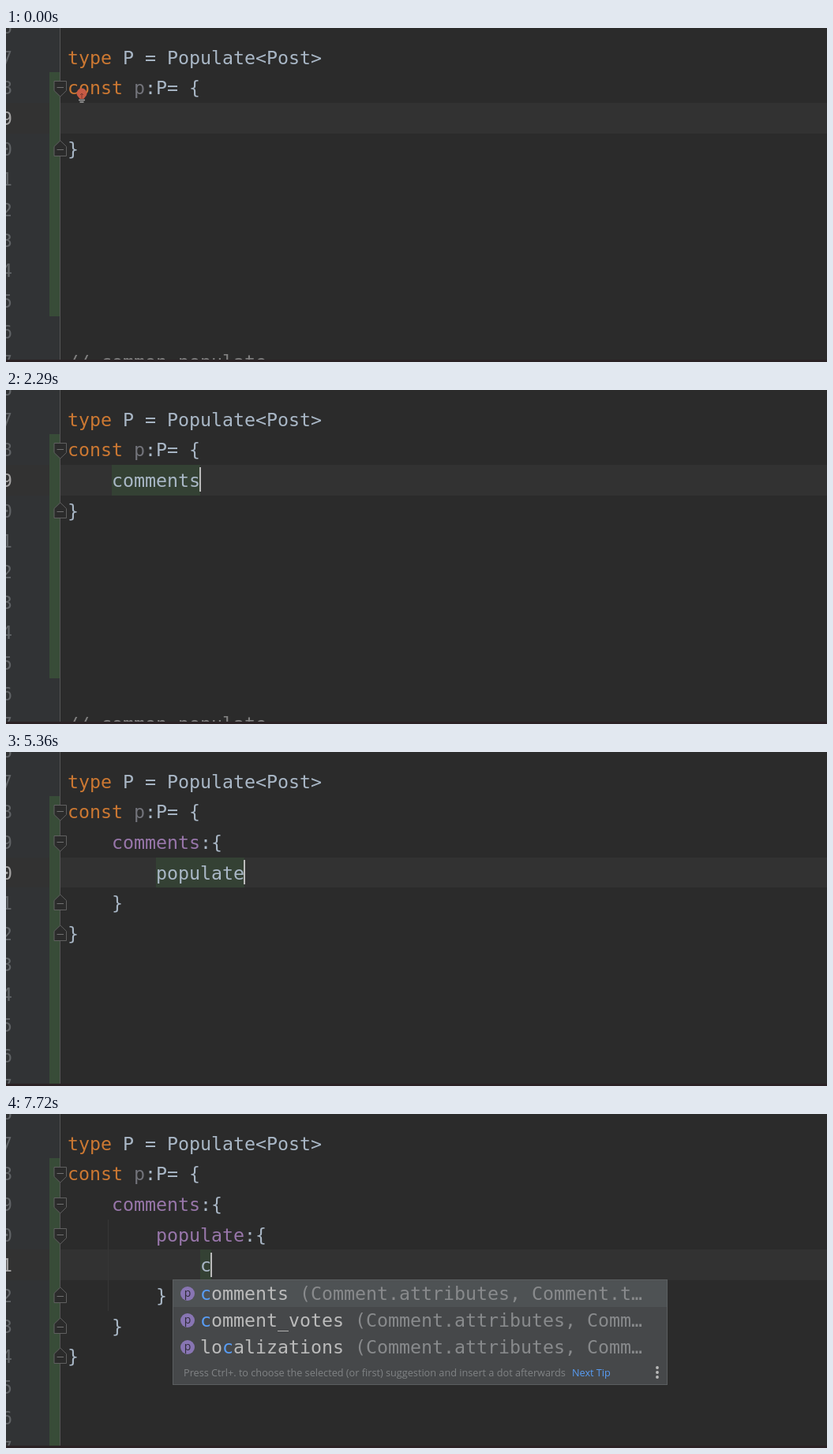
Animation of 1040x424 px, one loop 8000 ms. Source, as an HTML page:

```html
<!DOCTYPE html>
<html lang="en">
<head>
<meta charset="utf-8">
<title>Typed completion</title>
<style>
html, body { margin: 0; width: 100%; height: 100%; overflow: hidden; background: #2b2b2b; }
svg { display: block; width: 100vw; height: 100vh; }
text { white-space: pre; font: 23.25px "DejaVu Sans Mono", monospace; }
.tip { font: 12.7px "Open Sans", sans-serif; }
.icon { font: 14px "Open Sans", sans-serif; }
</style>
</head>
<body>
<svg id="stage" viewBox="0 0 1040 424"></svg>
<script>
(() => {
const stage = document.getElementById('stage');
const LOOP = 8000, CHAR = 14, LEFT = 78, ROW = 38.67, NEVER = 1e9;
const TEXT = '#a9b7c6', KEY = '#cc7832', PROP = '#9876aa', DIM = '#72737a';

// Each word is typed, completed from the popup, then opened as a nested object.
const words = [
  { word: 'comments', type: 1690, mark: 1760, popup: 1830, accept: 2290, wave: 2710,
    colon: 2910, brace: 3240, error: 3310, fixed: 3640, enter: 3640, fold: 4170,
    owner: 'Post', items: ['comments', 'localizations'] },
  { word: 'populate', type: 4830, mark: 4900, popup: 4900, accept: 5360, wave: 5760,
    colon: 5960, brace: 6310, error: 6450, fixed: 6850, enter: 7050, fold: 7380,
    owner: 'Populate', items: ['populate'] },
  { word: 'comments', type: 7510, mark: 7580, popup: 7650, accept: NEVER, wave: NEVER,
    colon: NEVER, brace: NEVER, error: NEVER, fixed: NEVER, enter: NEVER, fold: NEVER,
    owner: 'Comment', items: ['comments', 'comment_votes', 'localizations'] }
];

const rowTop = line => 17.5 + ROW * line;
const edge = line => Math.round(rowTop(line));
const baseline = line => Math.round(rowTop(line) + 28);
const colX = col => LEFT + CHAR * col;
const within = (t, a, b) => t >= a && t < b;

const rect = (x, y, w, h, fill, extra = '') =>
  `<rect x="${x}" y="${y}" width="${w}" height="${h}" fill="${fill}" ${extra}/>`;
const path = (d, stroke, fill = 'none', width = 1) =>
  `<path d="${d}" stroke="${stroke}" fill="${fill}" stroke-width="${width}"/>`;
const safe = s => s.replace(/&/g, '&amp;').replace(/</g, '&lt;');
const label = (x, y, s, fill, cls = '') =>
  `<text x="${x}" y="${y}" fill="${fill}" class="${cls}">${safe(s)}</text>`;
const code = (line, col, s, fill = TEXT) => label(colX(col), baseline(line), s, fill);
const mark = (line, col, n, fill) =>
  rect(colX(col), edge(line), n * CHAR, edge(line + 1) - edge(line), fill);

function wave(line, col, n) {
  const y = edge(line) + 30.5, end = colX(col + n) - 1;
  let d = `M${colX(col)} ${y + 3}`;
  for (let x = colX(col) + 3, up = true; x <= end; x += 3, up = !up) d += `L${x} ${y + (up ? 0 : 3)}`;
  return path(d, '#bc3f3c', 'none', 1.2);
}

function fold(line, open) {
  const y = edge(line) + (open ? 11.5 : 28.5), s = open ? 1 : -1;
  return path(`M61 ${y}H76.500V${y + 12 * s}L68.750 ${y + 19.5 * s}L61 ${y + 12 * s}Z`, '#606060', '#2b2b2b') +
    path(`M64.500 ${y + 8 * s}H73`, '#707070');
}

function gutter(current, depth) {
  let out = rect(0, 0, 68, 424, '#313335') +
    rect(0, edge(current), 1040, edge(current + 1) - edge(current), '#323232') +
    rect(55, 56, 14, edge(9 + 2 * depth) - 56, '#384c38') +
    rect(68, 0, 1, 424, '#555555');
  for (let i = -1; i <= 10; i++)
    out += label(-6, baseline(i), String((i + 7) % 10), i === current ? '#a4a3a3' : '#606366');
  return out;
}

function property(t, p, level) {
  if (t < p.type) return '';
  const line = 2 + level, col = 4 * (level + 1), end = col + p.word.length;
  const shown = t < p.accept ? p.word[0] : p.word;
  const matched = within(t, p.error, p.enter);
  let out = '';
  if (within(t, p.mark, p.colon)) out += mark(line, col, shown.length, '#344134');
  if (matched) out += mark(line, end + 1, 2, '#3b514d');
  out += code(line, col, shown, t < p.colon ? TEXT : PROP);
  if (t >= p.colon) out += code(line, end, ':');
  if (t >= p.brace) out += code(line, end + 1, t < p.enter ? '{}' : '{', matched ? '#ffef28' : TEXT);
  if (within(t, p.wave, p.brace)) out += wave(line, col, p.word.length);
  if (within(t, p.error, p.fixed)) out += wave(line, end + 3, 1) + wave(line + 1, col - 4, 1);
  return out;
}

function caret(t, depth) {
  if (t < 950 || within(t, 1490, 1690)) return '';
  const p = words[depth];
  let col = 4 * (depth + 1);
  if (t >= p.type) col += t < p.accept ? 1 : p.word.length;
  if (t >= p.colon) col++;
  if (t >= p.brace) col++;
  return rect(colX(col) - 1, Math.round(rowTop(2 + depth) + 3.5), 2, 31, '#bbbbbb');
}

function popup(p, level) {
  const x = colX(4 * (level + 1)) - 35, y = Math.floor(rowTop(3 + level));
  const n = p.items.length, h = 34 * n + 32;
  let out = rect(x + .5, y + .5, 626, h - 1, '#46484a', 'stroke="#5b5e60"') +
    rect(x + 1, y + 1, 625, 34, '#4e5254');
  p.items.forEach((name, i) => {
    const cy = y + 18 + 34 * i, base = cy + 8, hit = name.indexOf(p.word[0]);
    const full = `${name} (${p.owner}.attributes, ${p.owner}.type, ${p.owner}.key)`;
    const detail = full.slice(name.length, 39) + '…';
    const at = k => x + 35 + CHAR * k;
    out += `<circle cx="${x + 19}" cy="${cy}" r="9" fill="#8875b3"/>` +
      `<text x="${x + 19}" y="${cy + 4}" fill="#2f2b38" text-anchor="middle" class="icon">p</text>` +
      label(at(0), base, name.slice(0, hit), '#bbbbbb') +
      label(at(hit), base, name[hit], '#589df6') +
      label(at(hit + 1), base, name.slice(hit + 1), '#bbbbbb') +
      label(at(name.length), base, detail, '#888a8c');
  });
  const foot = y + h - 11;
  out += label(x + 14, foot, 'Press Ctrl+. to choose the selected (or first) suggestion and insert a dot afterwards', '#808385', 'tip') +
    label(x + 506, foot, 'Next Tip', '#589df6', 'tip');
  for (const dy of [-11, -5, 1]) out += `<circle cx="${x + 614}" cy="${foot + dy}" r="1.9" fill="#bbbbbb"/>`;
  return out;
}

function bulb() {
  return '<path d="M96 76.500a6.500 6.500 0 0 1 4 11.500l-1.500 2h-5l-1.500-2a6.500 6.500 0 0 1 4-11.500z" fill="#c75b45"/>' +
    path('M94 85l2-2 2 2M96 83v6', '#7d392f') +
    path('M92 91.500h8M93.500 94h5', '#a7a7a7', 'none', 1.5);
}

function pointer(t) {
  const step = Math.min(9, Math.floor((t - 70) / 75.5)) / 9;
  const k = 1 - (1 - step) ** 2;
  const x = 889 + (297.5 - 889) * k, y = 374 + (125 - 374) * k;
  return path(`M${x - 5} ${y - 10}h4l1 1l1-1h4M${x} ${y - 9}v18M${x - 5} ${y + 10}h4l1-1l1 1h4`, '#d0d0d0', 'none', 1.4);
}

function draw(t) {
  const depth = words.filter(p => t >= p.enter).length;
  let out = rect(0, 0, 1040, 424, '#2b2b2b') + gutter(2 + depth, depth);
  if (t >= 7380) out += rect(129, edge(3), 1, edge(6) - edge(3), '#373737');

  out += code(0, 0, 'type', KEY) + code(0, 5, 'P = Populate<Post>') +
    code(1, 0, 'const', KEY) + code(1, 6, 'p', DIM) + code(1, 7, ':P= {') +
    code(10 + 2 * depth, 0, '// common populate', '#808080');

  words.forEach((p, level) => out += property(t, p, level));
  for (let level = 0; level <= depth; level++) {
    const close = 3 + 2 * depth - level;
    out += code(close, 4 * level, '}');
    if (level === 0 || t >= words[level - 1].fold) out += fold(1 + level, true) + fold(close, false);
  }

  if (t < 1090) out += bulb();
  out += caret(t, depth);
  words.forEach((p, level) => { if (within(t, p.popup, p.accept)) out += popup(p, level); });
  if (within(t, 70, 1020)) out += pointer(t);
  return out + rect(0, 421, 1040, 3, '#2b2225');
}

let last = '';
function tick() {
  const next = draw(performance.now() % LOOP);
  if (next !== last) stage.innerHTML = last = next;
  requestAnimationFrame(tick);
}
tick();
})();
</script>
</body>
</html>
```
